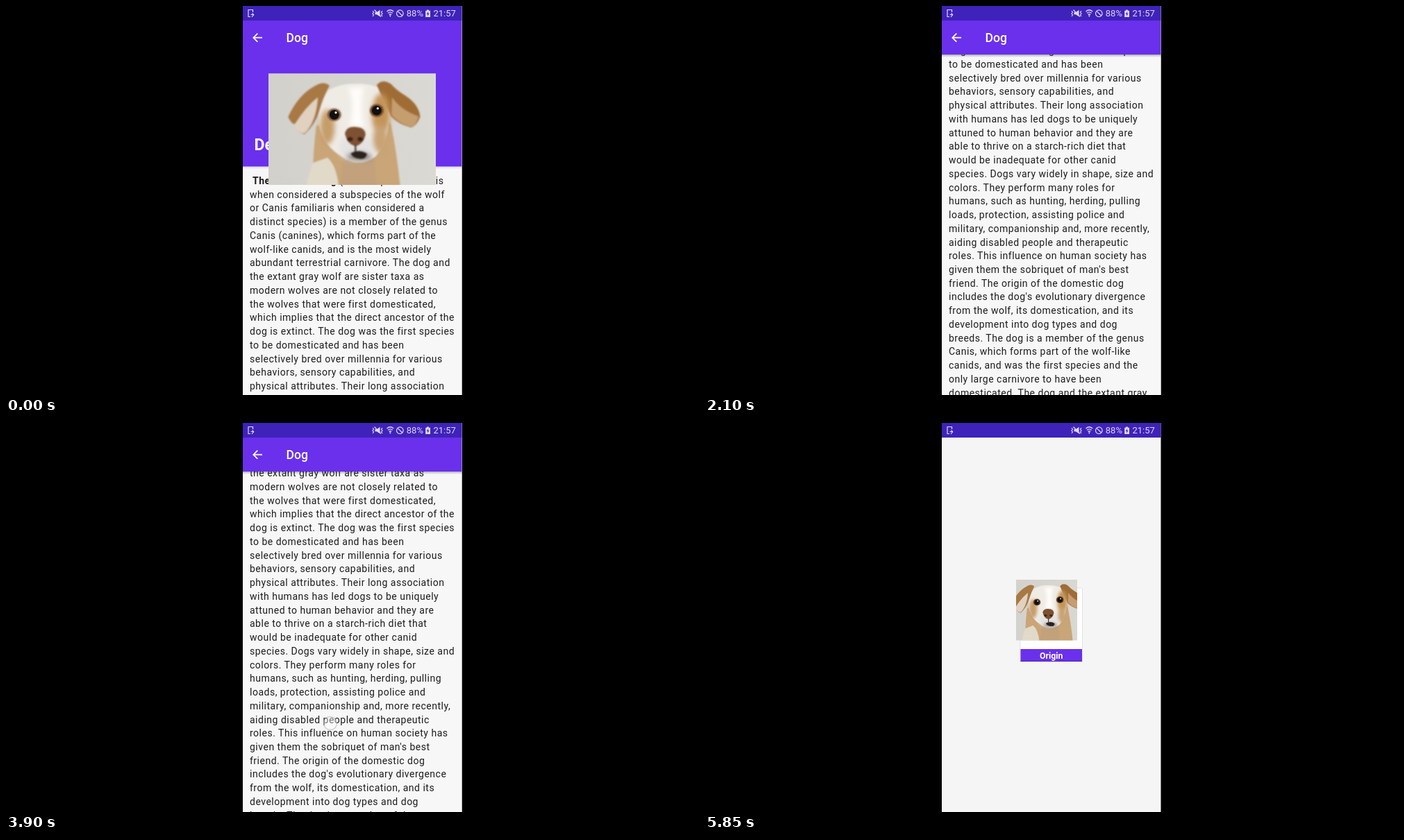
These frames come from a looping animation (998 px wide and 561 px high, 7850 ms). An HTML page:

```html
<!DOCTYPE html>
<html lang="en">
<head>
<meta charset="utf-8">
<style>
  html, body { margin: 0; width: 100%; height: 100%; overflow: hidden; background: #000; }
  svg { display: block; }
  text { font-family: Roboto, sans-serif; white-space: pre; }
  #article { font-size: 14px; letter-spacing: .5px; fill: #1c1c1c; }
  .title { font-size: 17.5px; font-weight: 500; fill: #fff; }
  .bold { font-weight: 700; }
  #status text { font-size: 13px; fill: #e0d9f6; }
</style>
</head>
<body>
<svg id="stage" width="100%" height="100%" viewBox="0 0 998 561">
  <defs>
    <clipPath id="phone"><rect x="341" width="315.5" height="561"/></clipPath>
    <clipPath id="headerClip"><rect id="headerBox" x="341" y="21" width="315.5" height="210.5"/></clipPath>
    <linearGradient id="shade" x2="0" y2="1">
      <stop stop-opacity=".28"/><stop offset="1" stop-opacity="0"/>
    </linearGradient>
    <linearGradient id="wall">
      <stop stop-color="#d2d0ca"/><stop offset="1" stop-color="#dbd9d4"/>
    </linearGradient>
    <filter id="soft" x="-20%" y="-20%" width="140%" height="140%"><feGaussianBlur stdDeviation="1.6"/></filter>
    <filter id="fur" x="-40%" y="-40%" width="180%" height="180%"><feGaussianBlur stdDeviation="5"/></filter>

    <symbol id="photo" viewBox="341 21 315.5 210.5" preserveAspectRatio="xMidYMid slice">
      <rect x="340" y="20" width="318" height="213" fill="url(#wall)"/>
      <g filter="url(#soft)">
        <path d="M431 120Q425 170 425 205L408 240H590Q583 170 572 118L556 90Z" fill="#c9a577"/>
        <path d="M425 190Q416 215 410 240H474Q470 195 452 180Z" fill="#e2dac9"/>
        <path d="M482 185L475 240H545L540 180Z" fill="#c2a17b"/>
        <path d="M455 52Q480 38 508 41Q535 39 554 52Q574 82 567 120Q560 160 542 178Q512 200 480 178Q448 160 438 125Q430 85 455 52Z" fill="#efebe5"/>
        <path d="M456 44Q445 34 428 45Q397 62 378 103Q384 116 391 117Q395 133 409 136Q430 116 437 92Q444 67 456 44Z" fill="#a87845"/>
        <path d="M434 66Q411 84 390 118Q395 134 409 134Q431 112 434 66Z" fill="#e0d2bf"/>
        <path d="M545 43Q556 30 572 41Q580 51 599 63Q625 80 627 103Q620 120 610 123Q585 117 571 101Q556 72 545 43Z" fill="#a06c36"/>
        <path d="M574 66Q590 90 624 102Q619 120 610 122Q583 114 573 99Z" fill="#c59e70"/>
      </g>
      <g filter="url(#fur)">
        <ellipse cx="452" cy="122" rx="14" ry="33" fill="#c69d6a"/>
        <ellipse cx="553" cy="99" rx="17" ry="40" fill="#c39458"/>
        <ellipse cx="552" cy="145" rx="14" ry="27" fill="#c8a374"/>
        <path d="M491 48Q506 76 493 122L521 122Q512 80 521 47Z" fill="#fffdf9"/>
        <ellipse cx="506" cy="161" rx="32" ry="26" fill="#e5e3e2"/>
        <ellipse cx="512" cy="178" rx="24" ry="8" fill="#88807c"/>
      </g>
      <g filter="url(#soft)">
        <ellipse cx="465" cy="99" rx="13" ry="12" fill="#765237"/>
        <ellipse cx="545" cy="91" rx="13" ry="12" fill="#6b4324"/>
        <path d="M485 134Q488 121 505 122Q524 123 524 137Q519 156 505 158Q490 156 485 134Z" fill="#7d5130"/>
        <path d="M496 172Q512 163 527 173Q524 184 513 182Q500 181 496 172Z" fill="#29211f"/>
        <path d="M505 155V169" stroke="#4a3930" stroke-width="3"/>
      </g>
      <circle cx="465" cy="99" r="9" fill="#11100f"/>
      <circle cx="545" cy="91" r="9" fill="#11100f"/>
      <g fill="#e9edf0">
        <circle cx="468" cy="95" r="2.2"/><circle cx="547" cy="87" r="2.2"/>
      </g>
      <g fill="#3b2419" filter="url(#soft)">
        <ellipse cx="495" cy="145" rx="5" ry="4"/><ellipse cx="514" cy="145" rx="5" ry="4"/>
      </g>
    </symbol>
  </defs>

  <rect width="998" height="561"/>
  <g clip-path="url(#phone)">
    <rect x="341" width="316" height="561" fill="#f5f5f5"/>
    <g id="card">
      <rect x="453.5" y="237.5" width="90.5" height="107.5" rx="1.5" fill="#e3e3e3"/>
      <rect x="454.5" y="238.5" width="88.5" height="88" fill="#fff"/>
      <rect x="454.5" y="326" width="88.5" height="17.5" fill="#6a30ec"/>
      <path d="M454.5 343.5H543" stroke="#4a22b0"/>
      <text class="bold" x="498.7" y="340" text-anchor="middle" font-size="12.3" fill="#fff">Origin</text>
    </g>

    <g id="page">
      <rect x="341" width="316" height="561" fill="#f7f7f7"/>
      <g id="article"></g>
      <rect id="shadow" x="341" width="316" height="4" fill="url(#shade)"/>
      <g clip-path="url(#headerClip)">
        <rect x="341" y="21" width="316" height="211" fill="#6a30ec"/>
        <use id="headerPhoto" href="#photo" x="341" y="21" width="315.5" height="210.5"/>
        <rect id="scrim" x="341" y="21" width="316" height="211" fill="#6a30ec"/>
        <text id="heading" class="bold" x="357.5" font-size="23" fill="#fff">Destination</text>
        <text class="title" x="403.5" y="52">Dog</text>
        <path d="M369 45.7H356.5M362.3 39.7L356.3 45.7L362.3 51.7" fill="none" stroke="#fff" stroke-width="1.8"/>
      </g>
    </g>
    <use id="flyingPhoto" href="#photo"/>
    <circle id="touch" r="9.5" fill="#fff" fill-opacity=".4" stroke="#999" stroke-opacity=".4" stroke-width="1.5"/>

    <g id="status">
      <rect x="341" width="316" height="21" fill="#3f22b9"/>
      <g fill="none" stroke="#e0d9f6" stroke-width="1.2">
        <path d="M355.5 9V5.5H349V15.5H352M352.5 12.5H356.5M354.5 10.5L356.7 12.5L354 16"/>
        <path d="M528 7L529.5 9L528 11L529.5 13L528 15M542 7L540.5 9L542 11L540.5 13L542 15M530.5 5.5L540 15.5"/>
        <path d="M548.5 8Q553.3 3.5 558.2 8M550 10.3Q553.3 7.3 556.7 10.3M551.7 12.5Q553.3 11 555 12.5"/>
        <circle cx="567.3" cy="10.7" r="4.8"/><path d="M564 7.3L570.7 14"/>
      </g>
      <g fill="#e0d9f6">
        <path d="M531.5 9H534L538.5 5.8V15.2L534 12.2H531.5ZM552 13.5H554.7L553.3 16ZM604.2 6.8H606V5.5H609V6.8H611V16H604.2Z"/>
      </g>
      <path d="M608.3 8L605.6 11.8H607.4L606.8 14.8L609.7 10.8H607.9Z" fill="#3f22b9"/>
      <text x="576.8" y="15.4">88%</text>
      <text x="615.5" y="15.4">21:57</text>
    </g>
  </g>
</svg>
<script>
const LOOP = 7850, STEP = 150;
const COLLAPSE = 161.5;
const FULL = [341, 21, 315.5, 210.5];
const OPENING = [378, 97.3, 241, 160.7];
const THUMB = [448, 226, 88, 87.5];

const lines = `(Canis lupus familiaris
when considered a subspecies of the wolf
or Canis familiaris when considered a
distinct species) is a member of the genus
Canis (canines), which forms part of the
wolf-like canids, and is the most widely
abundant terrestrial carnivore. The dog and
the extant gray wolf are sister taxa as
modern wolves are not closely related to
the wolves that were first domesticated,
which implies that the direct ancestor of the
dog is extinct. The dog was the first species
to be domesticated and has been
selectively bred over millennia for various
behaviors, sensory capabilities, and
physical attributes. Their long association
with humans has led dogs to be uniquely
attuned to human behavior and they are
able to thrive on a starch-rich diet that
would be inadequate for other canid
species. Dogs vary widely in shape, size and
colors. They perform many roles for
humans, such as hunting, herding, pulling
loads, protection, assisting police and
military, companionship and, more recently,
aiding disabled people and therapeutic
roles. This influence on human society has
given them the sobriquet of man's best
friend. The origin of the domestic dog
includes the dog's evolutionary divergence
from the wolf, its domestication, and its
development into dog types and dog
breeds. The dog is a member of the genus
Canis, which forms part of the wolf-like
canids, and was the first species and the
only large carnivore to have been
domesticated. The dog and the extant gray
wolf are sister taxa, as modern wolves are
not closely related to the population of
wolves that was first domesticated. The
genetic divergence between dogs and
wolves occurred between 40,000–20,000
years ago, just before or during the Last
Glacial Maximum. This timespan represents
the upper time-limit for the commencement
of domestication because it is the time of
divergence and not the time of
domestication, which occurred later.`.split("\n");

const $ = id => document.getElementById(id);
const set = (id, attrs) => {
  for (const name in attrs) $(id).setAttribute(name, attrs[name]);
};
const clamp = v => Math.max(0, Math.min(1, v));
const mix = (a, b, p) => a + (b - a) * p;

// Linear interpolation through [time, value] points
function along(points, t) {
  const i = points.findIndex(p => p[0] > t);
  if (i < 0) return points[points.length - 1][1];
  if (i === 0) return points[0][1];
  const [t0, v0] = points[i - 1], [t1, v1] = points[i];
  return mix(v0, v1, (t - t0) / (t1 - t0));
}

const scrollPath = [
  [600, 0], [750, 14], [900, 62], [1050, 128.5], [1350, 258], [1650, 350], [1950, 398], [2100, 405],
  [2250, 405], [2400, 418], [2550, 458], [2850, 560], [3000, 590], [3150, 603.5], [3300, 605],
  [3450, 588], [3600, 515], [3900, 318], [4050, 238], [4200, 185], [4350, 162],
  [4500, 130], [4650, 72], [4800, 22], [4950, 0]
];
const scrimPath = [[1050, 0], [1650, 1], [4350, 1], [4900, 0]];
const pagePath = [[5400, 1], [5550, .7], [5700, .12], [5850, 0]];
const flightPath = [[5400, 0], [5550, .25], [5700, .75], [5850, 1]];

// Each drag: start, end, x, and finger height at zero scroll
const drags = [
  [750, 1200, 457, 514.5], [2400, 2850, 462, 890],
  [3450, 4050, 467, 751], [4500, 5100, 459, 519]
];

$("article").innerHTML = lines.map((line, i) =>
  `<text x="351" y="${257 + i * 19.74}">${i ? "" : ' <tspan class="bold">The domestic dog</tspan> '}${line}</text>`
).join("");

function draw(time) {
  const t = Math.floor(time / STEP) * STEP;
  const scroll = along(scrollPath, t);
  const collapsed = Math.min(scroll, COLLAPSE);
  const bottom = 231.5 - collapsed;
  const opening = t < 150, closing = t >= 5550;
  const flying = opening || closing;

  set("article", { transform: `translate(0 ${-scroll})` });
  set("headerBox", { height: bottom - 21 });
  set("shadow", { y: bottom, opacity: scroll > 0 ? 1 : .4 });
  set("headerPhoto", { y: 21 - collapsed / 2, visibility: flying ? "hidden" : "visible" });
  set("scrim", { opacity: along(scrimPath, t) });
  set("heading", { y: 207.7 - collapsed, opacity: clamp(1 - scroll / 100) });
  set("page", { opacity: along(pagePath, t) });

  const p = along(flightPath, t);
  const [x, y, width, height] = opening ? OPENING : FULL.map((v, i) => mix(v, THUMB[i], p));
  set("flyingPhoto", { x, y, width, height, visibility: flying ? "visible" : "hidden" });

  const drag = drags.find(([start, end]) => t >= start && t <= end);
  set("touch", { visibility: drag ? "visible" : "hidden" });
  if (drag) set("touch", { cx: drag[2], cy: drag[3] - scroll });
}

const begin = performance.now();
function tick() {
  draw((performance.now() - begin) % LOOP);
  requestAnimationFrame(tick);
}
tick();
</script>
</body>
</html>
```
